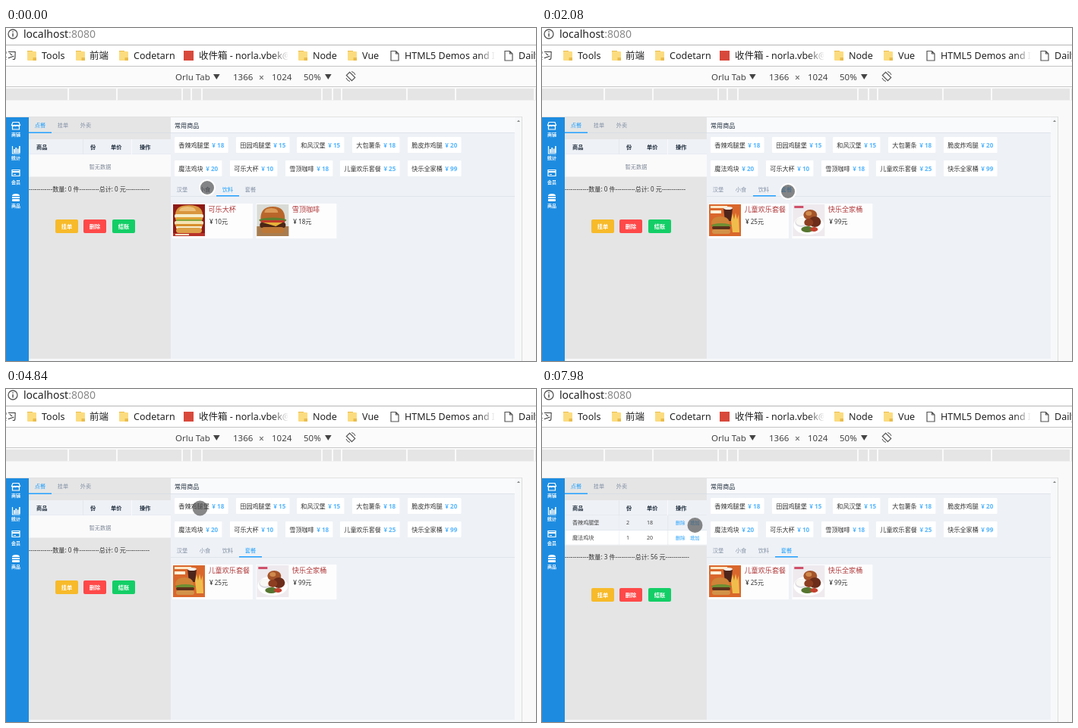
Animation of 698x440 px, one loop 8000 ms. Source, as an HTML page:

```html
<!DOCTYPE html>
<html lang="zh">
<head>
<meta charset="utf-8">
<style>
html, body { margin: 0; width: 100%; height: 100%; overflow: hidden; background: #f9f9f9; }
svg { display: block; font-family: "Noto Sans", "Noto Sans CJK SC", "Noto Sans CJK", sans-serif; }
</style>
</head>
<body>
<svg width="698" height="440" viewBox="0 0 698 440">
  <g id="base"></g>
  <g id="live"></g>
</svg>
<script>
const LOOP = 8000;
const BLUE = '#20a0ff', INK = '#1f2d3d', GRAY = '#8391a5', LINE = '#dfe5ec';

const rect = (x, y, w, h, fill, r = 0) =>
  `<rect x="${x}" y="${y}" width="${w}" height="${h}" fill="${fill}" rx="${r}"/>`;
const circle = (x, y, r, fill, extra = '') =>
  `<circle cx="${x}" cy="${y}" r="${r}" fill="${fill}" ${extra}/>`;
const oval = (x, y, rx, ry, fill) =>
  `<ellipse cx="${x}" cy="${y}" rx="${rx}" ry="${ry}" fill="${fill}"/>`;
const path = (d, fill, stroke = 'none', w = 1) =>
  `<path d="${d}" fill="${fill}" stroke="${stroke}" stroke-width="${w}"/>`;
const text = (x, y, s, size, fill = INK, extra = '') =>
  `<text x="${x}" y="${y}" font-size="${size}" fill="${fill}" ${extra}>${s}</text>`;
const mid = 'text-anchor="middle"';
const bold = 'font-weight="700"';

// Browser chrome
function chrome() {
  const folder = x => rect(x, 30, 7, 3, '#e9bd4f') + rect(x, 31, 12, 12, '#fbdc7f', 1) +
    path(`M${x + 7.5} 43v-4h4.5v4z`, '#e9bd4f');
  const page = x => path(`M${x} 30.5h6.5l3.5 3.5v9h-10zM${x + 6.5} 30.5v3.5h3.5`, '#fff', '#555', 1.2);
  const down = x => path(`M${x} 61h8.6l-4.3 7z`, '#444');
  const fade = (x, w) => rect(x, 25, w, 24, 'url(#fade)');
  const marks = [[-11, '实习'], [47, 'Tools'], [110, '前端'], [168, 'Codetarn'],
    [254, '收件箱 - norla.vbek@'], [404, 'Node'], [469, 'Vue'], [525, 'HTML5 Demos and I'], [675, 'Daily']];
  const gaps = [82, 146, 232, 244, 258, 416, 430, 442, 528, 592, 696];
  return `<linearGradient id="fade"><stop stop-color="#fff" stop-opacity="0"/>
    <stop offset="1" stop-color="#fff"/></linearGradient>` +
    rect(0, 0, 698, 51, '#fff') + rect(0, 22, 698, 1, '#b6b6b6') + rect(0, 50, 698, 1, '#c4c4c4') +
    circle(9, 8, 6, 'none', 'stroke="#555" stroke-width="1.3"') +
    rect(8.3, 7, 1.5, 4.5, '#555') + rect(8.3, 4.3, 1.5, 1.5, '#555') +
    text(23, 13, 'localhost<tspan fill="#888">:8080</tspan>', 14, '#222') +
    marks.map(([x, s]) => text(x, 41, s, 12.5, '#222')).join('') +
    [28, 92, 149, 385, 450].map(folder).join('') + [507, 657].map(page).join('') +
    rect(234, 30, 13, 13, '#d8493c') + fade(350, 22) + rect(372, 25, 10, 24, '#fff') + fade(622, 22) +
    rect(0, 51, 698, 27, '#fbfbfb') + rect(0, 77, 698, 1, '#cacaca') +
    text(223, 69, 'Orlu Tab', 11.5, '#444') + text(299, 69, '1366', 11.5, '#444') +
    text(333, 70, '×', 12, '#555') + text(350, 69, '1024', 11.5, '#444') +
    text(392, 69, '50%', 11.5, '#444') + down(273) + down(420) +
    `<g transform="rotate(-45 454 64)">${path('M451 59h6v10h-6z', 'none', '#555', 1.2)}</g>` +
    path('M448 66a6.5 6.5 0 0 0 5 4.5M460 62a6.5 6.5 0 0 0-5-4.5', 'none', '#555') +
    rect(0, 80, 698, 15.5, '#e5e5e5') + gaps.map(x => rect(x - 1, 80, 2, 15.5, '#fafafa')).join('');
}

// Page parts that never change
function shop() {
  const icons =
    path('M9 124.5h8l1.5 4h-11zM8.5 129v5h9v-5M7.5 128.5q1.8 2.5 3.6 0q1.8 2.5 3.7 0q1.8 2.5 3.6 0', 'none', '#fff', 1.2) +
    path('M8.5 156v10h10', 'none', '#fff', 1.2) +
    [[10, 5], [12.4, 7], [14.8, 5.5], [17, 9]].map(([x, h]) => rect(x, 165 - h, 1.7, h, '#fff')).join('') +
    path('M8 187.5h10v8h-10z', 'none', '#fff', 1.2) + rect(8, 189, 10, 2, '#fff') + rect(10, 193, 3, 1, '#fff') +
    path('M8 222q0-3 5-3t5 3z', '#fff') + rect(8, 223, 10, 2, '#fff') + rect(8, 226, 10, 3, '#fff', 1);
  const labels = ['商铺', '统计', '会员', '商品'].map((s, i) =>
    text(13, [143, 174, 206, 237][i], s, 6, '#fff', mid + bold)).join('');
  const goods = [
    [222, 0, '香辣鸡腿堡', 18], [303, 0, '田园鸡腿堡', 15], [383, 0, '和风汉堡', 15],
    [456, 0, '大包薯条', 18], [529, 0, '脆皮炸鸡腿', 20],
    [222, 1, '魔法鸡块', 20], [295, 1, '可乐大杯', 10], [368, 1, '雪顶咖啡', 18],
    [440, 1, '儿童欢乐套餐', 25], [529, 1, '快乐全家桶', 99]];
  const chips = goods.map(([x, row, s, price]) => {
    const y = 144 + row * 31;
    return rect(x, y, 30 + 8.1 * s.length, 21, '#fff', 1) +
      text(x + 5.3, y + 14, `${s}<tspan dx="3.5" fill="#58b7ff" ${bold}>¥ ${price}</tspan>`, 8.1, '#333');
  }).join('');
  return rect(0, 117, 680, 323, '#f7f8fa') + rect(0, 117, 680, 1, '#e2e2e2') + rect(679, 117, 1, 323, '#ddd') +
    path('M673 124h4l-2-2.5z', '#888') +
    rect(0, 118, 30, 322, '#1d8ce0') + icons + labels +
    rect(30, 118, 187, 319, '#e5e5e5') + rect(217, 118, 453, 319, '#eef1f6') +
    rect(30, 138, 187, 1, '#d8dfe6') + rect(30, 137.5, 30, 1.5, BLUE) +
    ['点餐', '挂单', '外卖'].map((s, i) => text(45 + 30 * i, 131, s, 7.2, i ? GRAY : BLUE, mid)).join('') +
    rect(30, 147, 187, 20, '#eef1f6') + rect(30, 166.5, 187, .5, '#dfe6ec') +
    [[40, '商品'], [111, '份'], [138, '单价'], [176, '操作']].map(([x, s]) => text(x, 159.5, s, 7.2, INK, bold)).join('') +
    rect(101, 147, .6, 20, '#dfe6ec') + rect(165, 147, 1, 20, '#f8f9fb') +
    rect(217, 118, 453, 20, '#f9fafc') + text(222, 132, '常用商品', 8.1) +
    rect(217, 138, 453, 1, LINE) + chips + rect(217, 222, 453, 1, LINE);
}

// Food pictures, 42 by 42
const bun = (x, y, w, h, fill) => path(`M${x - w} ${y}q0-${h} ${w}-${h}t${w} ${h}z`, fill);
const foods = {
  tower: rect(0, 0, 42, 42, '#8f1a16') + bun(21, 14, 18, 13, '#d9963e') + bun(19, 9, 11, 6, '#ecc07a') +
    rect(2, 13, 38, 5, '#f7eecb', 2) + rect(3, 17, 36, 4, '#dfa437', 2) + rect(4, 20, 34, 3, '#86a63c', 1) +
    rect(2, 22, 38, 5, '#f5e3b4', 2) + rect(3, 26, 36, 4, '#d78f2c', 2) + rect(4, 29, 34, 3, '#f6edcf', 1) +
    rect(4, 31, 34, 7, '#dd9f49', 4) + rect(0, 38, 42, 4, '#b8322a') + rect(3, 39, 18, 2, '#f3e2c4'),
  burger: rect(0, 0, 42, 42, '#d9dcd6') + rect(0, 29, 42, 13, '#a97c4e') + bun(21, 19, 16, 16, '#b9662a') +
    bun(19, 11, 9, 6, '#dc9a58') + oval(21, 21, 18, 3.5, '#5f7f2e') + rect(5, 21, 32, 4, '#c23a2b', 2) +
    rect(4, 24, 34, 7, '#4b2616', 3) + path('M8 24h26l-9 5z', '#e6b13a') + rect(6, 30, 30, 8, '#bd7837', 4),
  meal: rect(0, 0, 42, 42, '#d9672c') + rect(2, 2, 22, 3, '#ffe9c8') + rect(2, 8, 14, 4, '#fff0d8') +
    path('M19 5h12l-2 17h-8z', '#4d251b') + oval(25, 5, 6, 2, '#f6eee6') +
    path('M29 21l2-9l2 8l2-9l2 9l2-7l1 24h-9z', '#f0bd4c') + bun(15, 26, 12, 10, '#cf8438') +
    oval(16, 28, 13, 3, '#6f8f34') + rect(4, 29, 24, 4, '#5c301b', 2) + rect(4, 33, 24, 6, '#d2924a', 3),
  dish: rect(0, 0, 42, 42, '#eeeaee') + rect(2, 2, 12, 3, '#d0506a') + oval(21, 27, 20, 13, '#fff') +
    oval(11, 24, 8, 6, '#dddbe0') + oval(11, 23, 7, 5, '#faf8f4') + oval(23, 14, 9, 7, '#a4542a') +
    oval(29, 23, 8, 7, '#6c2d1a') + oval(21, 24, 6, 5, '#8d3d20') + oval(19, 33, 8, 4, '#55752f') +
    oval(28, 33, 5, 3, '#c3402e') + oval(21, 12, 4, 3, '#d08a4c')
};

const tabs = [
  { name: '汉堡', items: [['burger', '香辣鸡腿堡', 18], ['tower', '田园鸡腿堡', 15], ['burger', '和风汉堡', 15]] },
  { name: '小食', items: [['dish', '大包薯条', 18], ['burger', '脆皮炸鸡腿', 20], ['tower', '魔法鸡块', 20]] },
  { name: '饮料', items: [['tower', '可乐大杯', 10], ['burger', '雪顶咖啡', 18]] },
  { name: '套餐', items: [['meal', '儿童欢乐套餐', 25], ['dish', '快乐全家桶', 99]] }];

// [time, tab]
const clicks = [[-999, 2], [580, 0], [970, 1], [1670, 2], [2080, 3]];
// [first step, last step, steps, x, y]
const moves = [
  [130, 280, 2, 228, 213], [710, 710, 1, 191, 169], [840, 970, 2, 262, 212], [1230, 1360, 2, 291, 212],
  [1800, 2080, 3, 324, 216], [2460, 2590, 2, 329, 207], [2860, 3410, 5, 140, 304], [3720, 3720, 1, 206.5, 197.5],
  [3860, 4290, 4, 273, 147], [4430, 4710, 3, 255.5, 157.5], [5490, 6050, 5, 258, 180], [6640, 6920, 3, 182, 182],
  [7220, 7340, 2, 200, 180], [7860, 7860, 1, 201.5, 180]];
const presses = [0, 580, 970, 1670, 2080, 4710];

function pointer(t) {
  let x = 265, y = 211;
  for (const [a, b, n, tx, ty] of moves) {
    if (t < a) break;
    const step = n > 1 ? Math.floor((t - a) / (b - a) * (n - 1) + 1e-6) + 1 : 1;
    const k = Math.min(1, step / n);
    x += (tx - x) * k;
    y += (ty - y) * k;
  }
  return { x, y, down: presses.some(p => t >= p && t < p + 125) };
}

function catalog(t, p) {
  const i = clicks.findLastIndex(c => t >= c[0]);
  const [at, tab] = clicks[i];
  const from = i ? clicks[i - 1][1] : tab;
  const k = Math.min(1, (Math.floor((t - at) / 125) * 125 + 60) / 300);
  const ease = k < .5 ? 4 * k ** 3 : 1 - 4 * (1 - k) ** 3;
  const names = tabs.map(({ name }, j) => {
    const x = 232 + 30 * j;
    const hover = Math.abs(p.x - x) < 15 && Math.abs(p.y - 212) < 10;
    return text(x, 215.5, name, 7.2, j === tab ? BLUE : hover ? INK : GRAY, mid);
  }).join('');
  const cards = tabs[tab].items.map(([pic, name, price], j) => {
    const x = 219 + 110.3 * j;
    return rect(x, 232, 106, 46, '#fdfdfe') + `<g transform="translate(${x + 1} 233)">${foods[pic]}</g>` +
      text(x + 47.5, 243.2, name, 9.1, '#b03a3a') + text(x + 49, 259, `¥ ${price}元`, 8.1, '#333');
  }).join('');
  return names + rect(217 + 30 * (from + (tab - from) * ease), 221, 30, 1.5, BLUE) + cards;
}

function order(t) {
  const rows = [];
  if (t >= 5110) rows.push(['香辣鸡腿堡', t >= 7860 ? 2 : 1, 18]);
  if (t >= 6330) rows.push(['魔法鸡块', 1, 20]);
  const count = rows.reduce((s, r) => s + r[1], 0);
  const total = rows.reduce((s, r) => s + r[1] * r[2], 0);
  const h = rows.length * 19.7 || 29.5;
  const body = rows.map(([name, n, price], i) => {
    const y = 167 + 19.7 * i, base = y + 12.3;
    return (n > 1 ? rect(30, y, 187, 19.7, '#eef1f6') : '') + rect(30, y + 19, 187, .7, '#dfe6ec') +
      rect(101, y, .6, 19.7, '#e8edf2') + rect(165.5, y, .7, 19.7, '#dfe6ec') +
      text(40, base, name, 7.1, '#444') + text(111, base, n, 7.1, '#444') + text(138, base, price, 7.1, '#444') +
      text(176, base, '删除', 6.2, BLUE) + text(195, base, '增加', 6.2, BLUE);
  }).join('') || text(124, 185.5, '暂无数据', 7.2, '#7d8797', mid);
  const y = 167 + h, dash = n => '-'.repeat(n);
  const buttons = [[65, '挂单', '#f7ba2a'], [102, '删除', '#ff4949'], [140, '结账', '#13ce66']].map(([x, s, fill]) =>
    rect(x, y + 56.5, 30, 18, fill, 2) + text(x + 15, y + 68.2, s, 7.2, '#fff', mid + bold)).join('');
  return rect(30, 167, 187, h, rows.length ? '#fff' : '#fafafa') + body +
    text(30, y + 19, `${dash(12)}数量: ${count} 件${dash(10)}总计: ${total} 元${dash(12)}`, 8.1, '#333') + buttons;
}

const cursor = ({ x, y, down }) =>
  circle(x, y, 10, 'rgba(80,80,80,.68)', down ? 'stroke="#fff" stroke-width="2"' : '');

const live = document.getElementById('live');
document.getElementById('base').innerHTML = chrome() + shop();

let last = '';
function frame() {
  const t = performance.now() % LOOP;
  const p = pointer(t);
  const scene = catalog(t, p) + order(t) + cursor(p);
  if (scene !== last) live.innerHTML = last = scene;
  requestAnimationFrame(frame);
}
frame();
</script>
</body>
</html>
```
